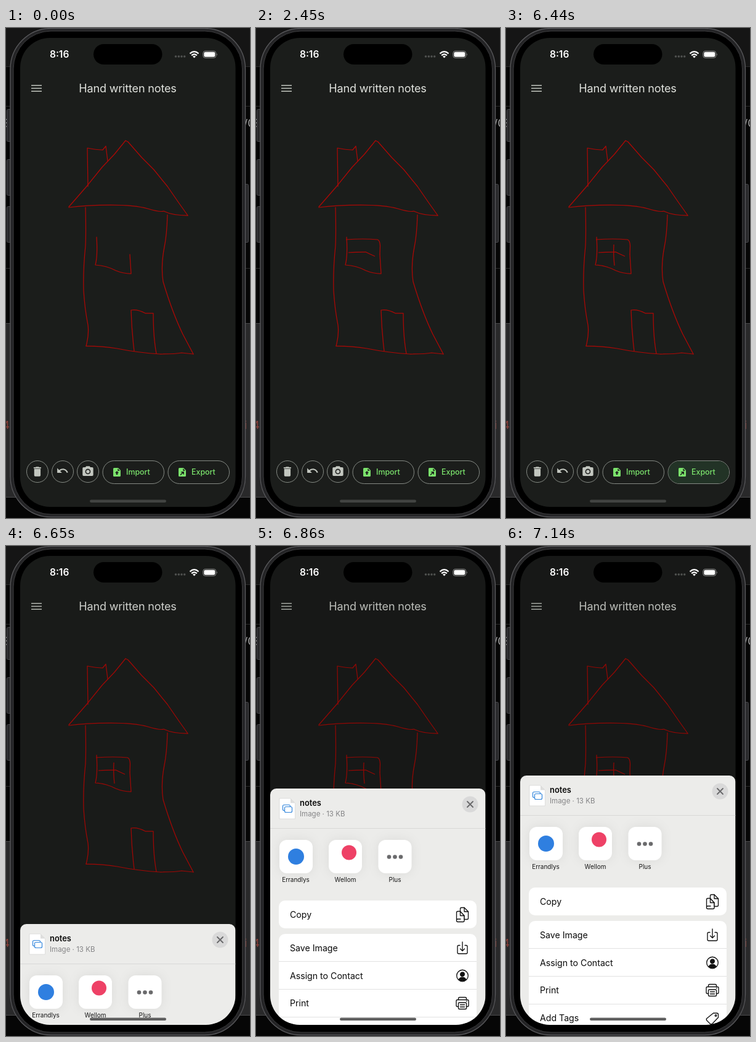
An HTML page for the animation above (8000 ms loop, 396 px wide and 792 px high).

```html
<!DOCTYPE html>
<html lang="en">
<head>
<meta charset="utf-8">
<title>Notes sketch</title>
<style>
  html, body { margin: 0; width: 100%; height: 100%; overflow: hidden; background: #060606; }
  svg { display: block; width: 396px; height: 792px; }
  text { font-family: Inter, "Open Sans", sans-serif; }
  .mono { font: 17px "Noto Sans Mono", "DejaVu Sans Mono", monospace; }
  .line { fill: none; stroke-linecap: round; stroke-linejoin: round; }
  .ink { stroke: #ae0805; stroke-width: 1.25; }
  .icon { fill: #c3c7c0; }
  .pill { fill: none; stroke: #858a84; }
  .label { font-size: 12.4px; font-weight: 500; fill: #7be36c; }
  .row { font-size: 14.15px; fill: #0a0a0a; }
  .app { font-size: 10px; fill: #161616; text-anchor: middle; }
  .glyph { stroke: #111; stroke-width: 1.35; }
  .tile { fill: #fff; filter: drop-shadow(0 0 9px rgba(0, 0, 0, .07)); }

  .draw { stroke-linecap: butt; stroke-dasharray: 1 2; stroke-dashoffset: 1.01; }
  .draw, .press, .dim, .sheet, .home { animation: 8s step-end infinite; }
  .frame { animation-name: frame; }
  .bar { animation-name: bar; }
  .post { animation-name: post; }
  .press { animation-name: press; }
  .dim { animation-name: dim; }
  .sheet { animation-name: rise; }
  .home { animation-name: home; }

  @keyframes frame {
    0% { stroke-dashoffset: 1.01; }
    .875% { stroke-dashoffset: 1; animation-timing-function: steps(10, jump-start); }
    9.625%, 100% { stroke-dashoffset: 0; }
  }
  @keyframes bar {
    0% { stroke-dashoffset: 1.01; }
    24.5% { stroke-dashoffset: 1; animation-timing-function: steps(4, jump-start); }
    28%, 100% { stroke-dashoffset: 0; }
  }
  @keyframes post {
    0% { stroke-dashoffset: 1.01; }
    45.5% { stroke-dashoffset: 1; animation-timing-function: steps(2, jump-start); }
    47.25%, 100% { stroke-dashoffset: 0; }
  }
  @keyframes press {
    0% { opacity: 0; }
    80.5%, 100% { opacity: 1; }
  }
  @keyframes dim {
    0% { opacity: 0; }
    82.25% { opacity: 0; animation-timing-function: steps(4, jump-start); }
    85.75%, 100% { opacity: .16; }
  }
  @keyframes home {
    0% { fill: #424442; }
    82.25%, 100% { fill: #5f5f5f; }
  }
  /* critically damped spring, held for 70 ms per step */
  @keyframes rise {
    0% { transform: translateY(800px); }
    82.25% { transform: translateY(761px); }
    83.125% { transform: translateY(611px); }
    84% { transform: translateY(488px); }
    84.875% { transform: translateY(422px); }
    85.75% { transform: translateY(392px); }
    86.625% { transform: translateY(379px); }
    87.5% { transform: translateY(374px); }
    88.375% { transform: translateY(372px); }
    89.25%, 100% { transform: translateY(371px); }
  }
</style>
</head>
<body>
<svg viewBox="0 0 396 792">
  <defs>
    <clipPath id="screen"><rect x="23" y="16" width="349.500" height="758" rx="48"/></clipPath>
    <g id="file">
      <path fill="#7be36c" d="M1.500 0H8L12 4V12.500Q12 14 10.500 14H1.500Q0 14 0 12.500V1.500Q0 0 1.500 0Z"/>
      <path fill="#1b1d1b" d="M7.300 1V4.800H11Z"/>
    </g>
  </defs>

  <!-- desktop behind the phone -->
  <rect width="396" height="792" fill="#060606"/>
  <rect width="396" height="62" fill="#151515"/>
  <path stroke="#2c2c2c" d="M0 62.500H396M0 126.500H396M0 388.500H396"/>
  <rect y="477" width="396" height="282" fill="#29292a"/>
  <path stroke="#4a4a4b" d="M0 477.500H396M0 758.500H396"/>
  <g class="mono">
    <text x="-4" y="160" fill="#aaa">8</text>
    <text x="386" y="160" fill="#aaa">/0</text>
    <text x="-5" y="648" fill="#8d4038">4-</text>
    <text x="387" y="648" fill="#8d4038">i</text>
  </g>

  <!-- phone body -->
  <g fill="#29292b" stroke="#47474a">
    <rect x="1.500" y="131.500" width="8" height="52" rx="2"/>
    <rect x="1.500" y="212.500" width="8" height="58" rx="2"/>
    <rect x="1.500" y="288.500" width="8" height="58" rx="2"/>
    <rect x="385.500" y="252.500" width="8" height="94" rx="2"/>
  </g>
  <rect x="7" y=".5" width="381.500" height="790" rx="66" fill="#242426" stroke="#59595c" stroke-width="1.300"/>
  <rect x="12" y="5" width="371.500" height="781" rx="61" fill="#000" stroke="#3c3c3e"/>

  <g clip-path="url(#screen)">
    <rect x="23" y="16" width="350" height="758" fill="#1b1d1b"/>

    <path d="M41 92.800H58M41 97.500H58M41 102.200H58" stroke="#c3c7c0" stroke-width="1.600"/>
    <text x="197.500" y="104" font-size="18" letter-spacing="-.15" text-anchor="middle" fill="#e1e3de">Hand written notes</text>

    <g class="line ink">
      <path d="M102 289L130 257L156 225L176 204L194 182L198 184L220 209L240 229L262 256L280 282L295 303"/>
      <path d="M102 290Q130 286 170 286T230 292T256 296Q270 303 295 303"/>
      <path d="M133 256L132 194Q146 197 157 197L162 191L165 215"/>
      <path d="M129 290Q130 330 129 352Q125 390 126 425Q128 455 133 480Q135 496 130 514"/>
      <path d="M130 514Q158 514 180 518Q215 525 250 527Q275 527 285 525L304 527"/>
      <path d="M262 302Q261 335 257 354Q251 385 255 410Q270 460 287 495L304 527"/>
      <path d="M208 522Q204 490 203 456Q213 454 226 461L239 461Q239 500 244 526"/>
      <path d="M147 338Q149 368 145 383Q163 384 178 392Q190 397 203 397L201 366"/>
      <path class="draw frame" pathLength="1" d="M201 366L201.500 352Q201 343 197 342Q175 340 146 342"/>
      <path class="draw bar" pathLength="1" d="M150 363Q162 362 178 362Q186 366 193 369"/>
      <path class="draw post" pathLength="1" d="M175 350Q174 366 176 384"/>
    </g>

    <g class="pill">
      <circle cx="51" cy="717" r="17.500"/>
      <circle cx="92" cy="717" r="17.500"/>
      <circle cx="133" cy="717" r="17.500"/>
      <rect x="157" y="699.500" width="99.500" height="37" rx="18.500"/>
      <rect x="263" y="699.500" width="99.500" height="37" rx="18.500"/>
    </g>
    <rect class="press" x="263.500" y="700" width="98.500" height="36" rx="18" fill="#223326"/>
    <g class="icon">
      <path transform="translate(40.600 706.600) scale(.86)" d="M6 19Q6 21 8 21H16Q18 21 18 19V7H6ZM19 4H15.500L14.500 3H9.500L8.500 4H5V6H19Z"/>
      <path transform="translate(81.400 705.300) scale(.86)" d="M12.500 8Q8.800 8 5.600 10.600L2 7V16H11L7.400 12.400Q9.700 10.500 12.500 10.500C16 10.500 19 12.800 20.100 16L22.500 15.200C21.100 11 17.100 8 12.500 8Z"/>
      <path transform="translate(122.500 706.500) scale(.87)" fill-rule="evenodd" d="M9 2L7.200 4H4Q2 4 2 6V18Q2 20 4 20H20Q22 20 22 18V6Q22 4 20 4H16.800L15 2ZM12 7A5 5 0 1 1 12 17A5 5 0 1 1 12 7ZM12 8.800A3.200 3.200 0 1 0 12 15.200A3.200 3.200 0 1 0 12 8.800Z"/>
    </g>
    <use href="#file" x="174" y="711"/>
    <path d="M180 716L183.200 719.300H181.200V722H178.800V719.300H176.800Z" fill="#1b1d1b"/>
    <use href="#file" x="280" y="711"/>
    <path class="line" stroke="#1b1d1b" stroke-width="1.500" d="M283.500 722L288 717.800M284.800 717.700H288.200V721"/>
    <text class="label" x="195" y="722">Import</text>
    <text class="label" x="301" y="722">Export</text>

    <rect class="dim" x="23" y="16" width="350" height="758"/>

    <!-- share sheet -->
    <g class="sheet">
      <rect x="23" width="349.500" height="450" rx="10" fill="#ececea"/>
      <path d="M38 16H56L63.500 23.500V49H38Z" fill="#fff" stroke="#d4d4d3" stroke-width=".7"/>
      <path d="M56 16V23.500H63.500Z" fill="#dededd"/>
      <g fill="#fff" stroke="#3286dc" stroke-width="1.200">
        <rect x="43.500" y="26.500" width="12" height="9" rx="2"/>
        <rect x="46.500" y="29.500" width="12" height="9" rx="2"/>
      </g>
      <text x="71" y="28" font-size="12.900" font-weight="600" fill="#0a0a0a">notes</text>
      <text x="71" y="45" font-size="11.500" fill="#858587">Image · 13 KB</text>
      <circle cx="347.500" cy="25.500" r="13" fill="#d9d9d9"/>
      <path class="line" d="M343 21L352 30M352 21L343 30" stroke="#69696b" stroke-width="1.900"/>
      <path d="M23 64.500H373" stroke="#d8d8d7"/>

      <rect class="tile" x="38" y="83" width="54" height="54" rx="12"/>
      <rect class="tile" x="118" y="83" width="54" height="54" rx="12"/>
      <rect class="tile" x="198.500" y="83" width="54" height="54" rx="12"/>
      <circle cx="65" cy="110" r="13" fill="#2f7fe0"/>
      <circle cx="151" cy="103.500" r="12" fill="#ee4166"/>
      <g fill="#6a6a6c">
        <circle cx="216" cy="110.500" r="3.300"/>
        <circle cx="225.500" cy="110.500" r="3.300"/>
        <circle cx="235" cy="110.500" r="3.300"/>
      </g>
      <text class="app" x="64.500" y="151">Errandlys</text>
      <text class="app" x="145" y="151">Wellom</text>
      <text class="app" x="225.500" y="151">Plus</text>

      <rect x="37" y="181" width="321" height="45" rx="10" fill="#fff"/>
      <rect x="37" y="235" width="321" height="220" rx="10" fill="#fff"/>
      <path d="M37 279.500H358M37 324.500H358M37 369.500H358" stroke="#e2e2e2"/>
      <g class="row">
        <text x="55" y="209">Copy</text>
        <text x="55" y="263">Save Image</text>
        <text x="55" y="307.500">Assign to Contact</text>
        <text x="55" y="352">Print</text>
        <text x="55" y="397">Add Tags</text>
      </g>
      <g class="line glyph">
        <g transform="translate(335 204)">
          <path d="M-3 7H-7.500Q-9.500 7 -9.500 9V9.500Q-9.500 11.500 -7.500 11.500H1Q3 11.500 3 9.500V1L-3.500 -5.500H-7.500Q-9.500 -5.500 -9.500 -3.500V9"/>
          <path fill="#fff" d="M-3.500 -6V-9.500Q-3.500 -11.500 -1.500 -11.500H3L9.500 -5V5.500Q9.500 7.500 7.500 7.500H3V1.500L-3.500 -5.500Z"/>
          <path d="M3 -11.500V-5H9.500M-3.500 -5.500V1.500H3"/>
        </g>
        <g transform="translate(335 258)">
          <path d="M-4 -4.500H-6Q-8 -4.500 -8 -2.500V7Q-8 9 -6 9H6Q8 9 8 7V-2.500Q8 -4.500 6 -4.500H4"/>
          <path d="M0 -10V4.500M-3.500 1L0 4.500L3.500 1"/>
        </g>
        <g transform="translate(335 302.500)">
          <circle r="9.300"/>
          <circle cy="-2.300" r="3.300" fill="#111"/>
          <path fill="#111" d="M-5.700 6.300Q-4 2.600 0 2.600T5.700 6.300Q0 10.500 -5.700 6.300Z"/>
        </g>
        <g transform="translate(335 347)">
          <path d="M-6.500 5.500H-8Q-10 5.500 -10 3.500V-3.500Q-10 -5.500 -8 -5.500H8Q10 -5.500 10 -3.500V3.500Q10 5.500 8 5.500H6.500"/>
          <path d="M-6.500 -5.500V-7.500Q-6.500 -9.500 -4.500 -9.500H4.500Q6.500 -9.500 6.500 -7.500V-5.500"/>
          <rect x="-6.500" y="-1" width="13" height="10.500" rx="1.500"/>
          <path d="M-3.500 2.500H3.500M-3.500 6H3.500M6.500 -3.300H7"/>
        </g>
        <g transform="translate(335 392.500)">
          <path d="M1.500 -8.500H7Q9.500 -8.500 9.500 -6V-1.500L0 8.500Q-2 10 -4 8.500L-9 3.500Q-10.500 1.500 -9 0Z"/>
          <circle cx="5.500" cy="-4.500" r="1.300"/>
        </g>
      </g>
    </g>

    <!-- system overlays -->
    <rect class="home" x="136" y="762.500" width="124" height="4.500" rx="2.250"/>
    <text x="71" y="48.300" font-size="15.500" font-weight="600" fill="#fff">8:16</text>
    <rect x="142" y="26" width="111.500" height="33" rx="16.500"/>
    <g fill="#505250">
      <circle cx="275.500" cy="46" r="1.800"/>
      <circle cx="280.300" cy="46" r="1.800"/>
      <circle cx="285" cy="46" r="1.800"/>
      <circle cx="289.700" cy="46" r="1.800"/>
    </g>
    <g fill="none" stroke="#fff" stroke-width="2.300">
      <path d="M298.500 41.300Q305.500 35 312.500 41.300"/>
      <path d="M301.200 44.300Q305.500 40.500 309.800 44.300"/>
    </g>
    <path d="M303 46Q305.500 44 308 46L305.500 48.600Z" fill="#fff"/>
    <rect x="319.800" y="37.300" width="21" height="11" rx="3.500" fill="none" stroke="#8d8e8d"/>
    <rect x="321.300" y="38.800" width="18" height="8" rx="2.200" fill="#fff"/>
    <path d="M342.200 41Q344 42.800 342.200 44.700Z" fill="#8d8e8d"/>
  </g>
</svg>
</body>
</html>
```
